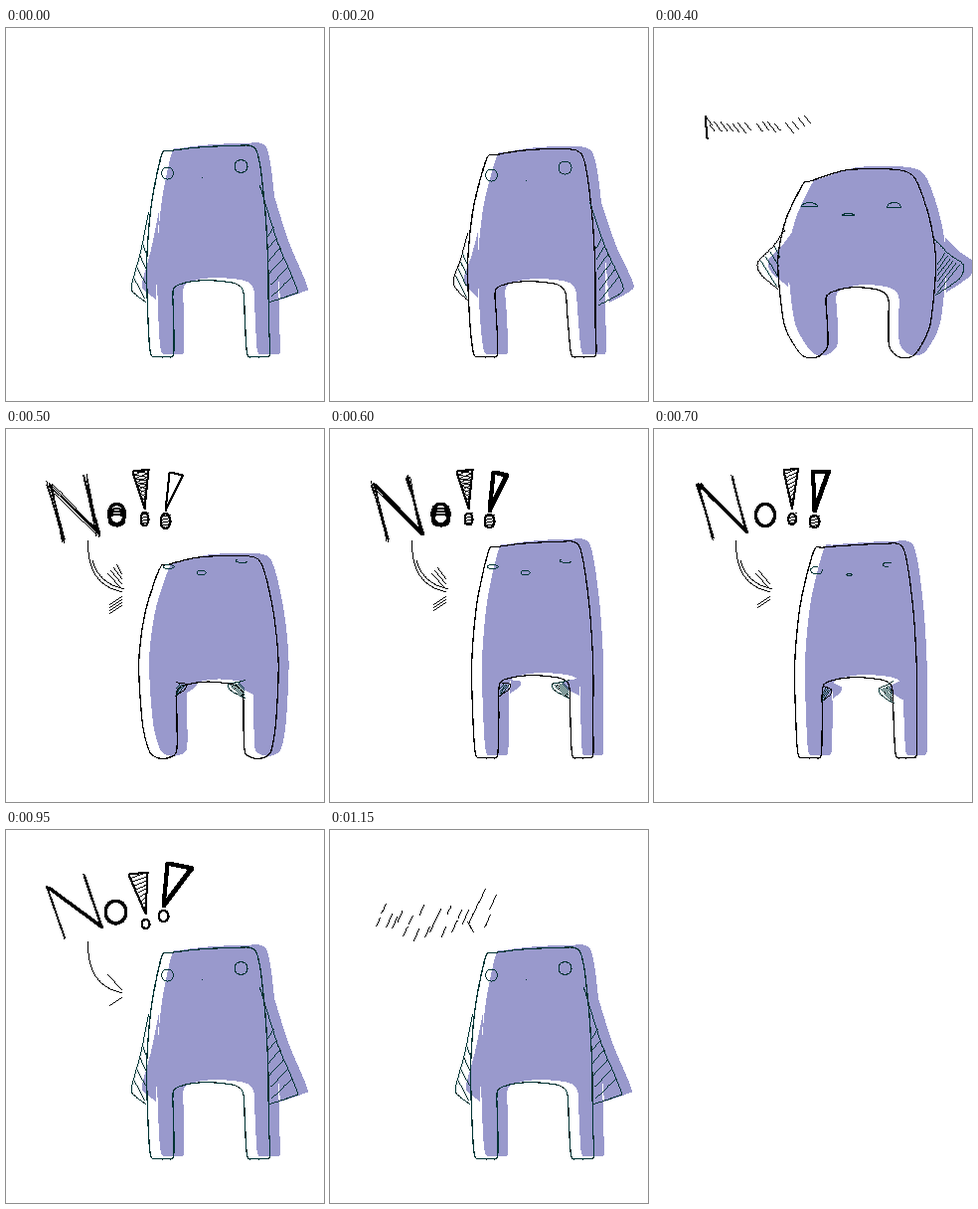
Write an HTML page with a canvas that moves like this. It is 320 by 375 pixels and loops after 1.2 s.

```html
<!DOCTYPE html>
<html lang="en">
<head>
<meta charset="utf-8">
<title>No!!</title>
<style>
html, body { margin: 0; width: 100%; height: 100%; overflow: hidden; background: #fff; }
canvas { display: block; width: 100vw; height: 100vh; image-rendering: pixelated; }
</style>
</head>
<body>
<canvas id="stage" width="320" height="375"></canvas>
<script>
const ctx = document.getElementById('stage').getContext('2d');
const BLACK = '#000', TEAL = '#003333', LILAC = '#9999cc';
const PI = Math.PI, LOOP = 1200, GROUND = 330, WAIST = 235;
const SHIFT = [11, -2]; // the colour is printed beside the ink

// head: left x, y, right x, y, top; feet: four edges, toe roundness; arch: left, right, y
// arms: shoulder, tip, wrist; eyes: x, y, rx, ry, from, to
const idle = {
  head: [156, 127, 251, 122, 118], waist: [141, 263], feet: [145, 168, 242, 265, 3], arch: [168, 238, 254],
  armL: [143, 185, 126, 258, 140, 275], armR: [255, 158, 292, 261, 265, 275],
  eyeL: [162, 145.5, 6, 6, 0, 2 * PI], eyeR: [236, 138.5, 6.5, 6.5, 0, 2 * PI], mouth: [197, 150, .4, .4, 0, 2 * PI]
};
const sink = {
  head: [157, 131, 253, 127, 121], waist: [138, 266], feet: [144, 168, 242, 267, 3], arch: [166, 236, 255],
  armL: [138, 206, 124, 252, 138, 273], armR: [261, 175, 294, 258, 270, 278],
  eyeL: [162, 147.5, 6, 6, 0, 2 * PI], eyeR: [236, 140, 6.5, 6.5, 0, 2 * PI], mouth: [197, 153, .4, .4, 0, 2 * PI]
};
const squash = {
  head: [149, 157, 260, 148, 141], waist: [124, 283], feet: [141, 174, 236, 268, 11], arch: [173, 235, 261],
  armL: [131, 203, 104, 235, 124, 262], armR: [282, 212, 311, 238, 283, 268],
  eyeL: [156, 179, 8, 4, PI, 2 * PI], eyeR: [241, 180, 7, 5, PI, 2 * PI], mouth: [195, 188, 6, 2, PI, 2 * PI]
};
const stretch = {
  head: [159, 122, 250, 117, 113], waist: [142, 264], feet: [146, 168, 243, 264, 3], arch: [170, 240, 248],
  armL: [171, 254, 181, 256, 170, 268], armR: [240, 252, 223, 256, 240, 270],
  eyeL: [163, 138, 5.5, 2, 0, 2 * PI], eyeR: [237, 132, 6, 2, .6, PI + .6], mouth: [196, 144, 4.5, 2.3, 0, 2 * PI]
};
const settle = {
  head: [161, 123, 250, 121, 117], waist: [140, 263], feet: [143, 167, 242, 263, 3], arch: [169, 238, 252],
  armL: [168, 260, 175, 267, 167, 279], armR: [240, 254, 229, 265, 241, 280],
  eyeL: [163, 145, 6, 6, -.4, PI + .4], eyeR: [236, 140, 7, 3, PI, 2 * PI], mouth: [196, 148, .6, .4, 0, 2 * PI]
};
const poses = [idle, sink, squash, stretch, settle, idle];
const moments = [0, 200, 400, 600, 800, 950];

// n: tops of both stems, stem vector; o: centre; bangs: two top corners and tip
const words = [
  { n: [43, 54, 78, 48, 15, 57], o: [111, 85], bang1: [127, 42, 143, 40, 139, 79], bang2: [164, 43, 177, 46, 160, 81] },
  { n: [44, 54, 78, 47, 14, 54], o: [112, 87], bang1: [133, 40, 146, 38, 138, 79], bang2: [155, 41, 173, 39, 162, 82] },
  { n: [41, 56, 78, 45, 18, 52], o: [110, 82], bang1: [123, 44, 142, 42, 140, 83], bang2: [162, 33, 186, 38, 158, 75] }
];

const lerp = (a, b, t) => a + (b - a) * t;
const mix = (a, b, t) => a.map((v, i) => lerp(v, b[i], t));

function blend(a, b, t, detail = t) {
  const out = {};
  for (const key in a) out[key] = mix(a[key], b[key], /arm|eye|mouth/.test(key) ? detail : t);
  return out;
}

function random(seed) {
  return () => (seed = (seed * 16807) % 2147483647) / 2147483647;
}

function line([x1, y1], [x2, y2], w = 1) {
  const n = Math.max(1, Math.ceil(Math.max(Math.abs(x2 - x1), Math.abs(y2 - y1))));
  for (let i = 0; i <= n; i++) {
    const x = lerp(x1, x2, i / n), y = lerp(y1, y2, i / n);
    ctx.fillRect(Math.round(x - (w - 1) / 2), Math.round(y - (w - 1) / 2), w, w);
  }
}

function trace(pts, w) {
  for (let i = 1; i < pts.length; i++) line(pts[i - 1], pts[i], w);
}

function smooth(pts, closed) {
  const n = pts.length, out = [], pull = .4;
  const at = i => pts[closed ? (i + n) % n : Math.min(n - 1, Math.max(0, i))];
  for (let i = 0; i < (closed ? n : n - 1); i++) {
    const [p, a, b, q] = [at(i - 1), at(i), at(i + 1), at(i + 2)];
    for (let t = 0; t < 1; t += 1 / 8) {
      const u = t * t * (3 - 2 * t), d = t * (1 - t) * (1 - t), e = t * t * (t - 1);
      out.push([0, 1].map(c => lerp(a[c], b[c], u) + pull * (d * (b[c] - p[c]) + e * (q[c] - a[c]))));
    }
  }
  out.push(closed ? out[0] : at(n - 1));
  return out;
}

// Hard-edged scanline fill
function area(pts, [dx, dy]) {
  for (let y = 0; y < 375; y++) {
    const xs = [], m = y + .5;
    pts.forEach(([ax, ay], i) => {
      const [bx, by] = pts[(i + 1) % pts.length];
      if ((ay <= m) !== (by <= m)) xs.push(lerp(ax, bx, (m - ay) / (by - ay)));
    });
    xs.sort((a, b) => a - b);
    for (let i = 0; i + 1 < xs.length; i += 2) {
      const x = Math.round(xs[i]);
      ctx.fillRect(x + dx, y + dy, Math.round(xs[i + 1]) - x, 1);
    }
  }
}

function bodyShape({ head, waist, feet, arch }) {
  const [lx, ly, rx, ry, top] = head, [left, right] = waist;
  const [f1, f2, f3, f4, toe] = feet, [al, ar, ay] = arch;
  const side = (x, y, edge, foot) => [
    [lerp(x, edge, .7), lerp(y, WAIST, .47)], [edge, WAIST], [lerp(edge, foot, .35), 295]
  ];
  const sole = (a, b) => [
    [a, GROUND - toe], [lerp(a, b, .3), GROUND], [lerp(a, b, .7), GROUND], [b, GROUND - toe]
  ];
  return smooth([
    [lx, ly], [lx + 9, ly - 4], [lerp(lx, rx, .38), top + 1.5], [lerp(lx, rx, .75), top], [rx, ry],
    ...side(rx, ry, right, f4), ...sole(f4, f3),
    [lerp(f3, ar, .6), 290], [ar, ay + 10], [ar - 9, ay + 2], [(al + ar) / 2, ay - 1], [al + 14, ay + 1], [al, ay + 8],
    [lerp(f2, al, .6), 290], ...sole(f2, f1), ...side(lx, ly, left, f1).reverse()
  ], true);
}

function armShape([sx, sy, tx, ty, wx, wy]) {
  return smooth([
    [sx, sy], [lerp(sx, tx, .48), lerp(sy, ty, .55)], [tx, ty], [lerp(tx, wx, .15), lerp(ty, wy, .45)], [wx, wy]
  ]);
}

// Strokes lean from the body up to the outer edge, longer towards the hand
function hatchArm([sx, sy, tx, ty, wx, wy], n) {
  for (let i = 0; i < n; i++) {
    const u = lerp(.45, .95, i / (n - 1)), reach = lerp(.55, .9, u);
    const from = [lerp(sx, wx, u) + (tx - wx) * .08, lerp(sy, wy, u)];
    line(from, mix(from, [lerp(sx, tx, u), lerp(sy, ty, u - .08)], reach));
  }
}

function arc(x, y, rx, ry, from = 0, to = 2 * PI) {
  return Array.from({ length: 25 }, (_, i) => {
    const a = lerp(from, to, i / 24);
    return [x + rx * Math.cos(a), y + ry * Math.sin(a)];
  });
}

function creature(stage) {
  const i = Math.min(4, Math.floor(stage)), t = stage - i;
  // Arms swap sides of the legs at once
  const jump = i === 2 || i === 4;
  const pose = blend(poses[i], poses[i + 1], t, jump ? Math.round(t) : t);
  const body = bodyShape(pose), arms = [armShape(pose.armL), armShape(pose.armR)];

  ctx.fillStyle = LILAC;
  for (const shape of [body, ...arms]) area(shape, SHIFT);

  ctx.fillStyle = poses[Math.round(stage)] === idle ? TEAL : BLACK;
  trace(body);
  trace(body.map(([x, y]) => [x + .3, y + .2]));
  trace(arms[0]);
  ctx.fillStyle = TEAL;
  trace(arms[1]);
  hatchArm(pose.armL, 4);
  hatchArm(pose.armR, 6);
  for (const part of [pose.eyeL, pose.eyeR, pose.mouth]) {
    const pts = arc(...part);
    trace(pts);
    if (part[4] > 3) line(pts[0], pts[24]); // flat lower lid
  }
}

function lettering(pos, rough) {
  const i = pos < 1 ? 0 : 1, { n, o, bang1, bang2 } = blend(words[i], words[i + 1], pos - i);
  const rnd = random(77 + Math.round(pos * 100)), bold = rough < 3.6 ? 4 : 2;
  const scratch = (a, b, w) => {
    const shake = p => p.map(v => v + (rnd() - .5) * (rough + 1.5));
    line(a, b, w);
    for (let k = 0; k < 2 + rough; k++) line(shake(a), shake(b));
  };
  const [lx, ly, rx, ry, vx, vy] = n, foot = [rx + vx, ry + vy];
  scratch([lx, ly], [lx + vx, ly + vy], 1);
  scratch([lx + 2, ly + 2], foot, bold - 1);
  scratch([rx, ry], foot, 2);

  const [ox, oy] = o, or = 11 - rough * .8;
  trace(arc(ox, oy, or, 12 - rough * .5), 3);
  if (rough > 2) for (let k = 2; k < 8; k += 2) trace(arc(ox, oy + k, or, 9 - k * .5), 2);

  [bang1, bang2].forEach((b, k) => {
    const p = b.slice(0, 2), q = b.slice(2, 4), tip = b.slice(4);
    const w = k ? bold : 2;
    line(p, q, w); line(q, tip, w); line(tip, p, w);
    if (!k) for (let u = .1; u < .9; u += .1) {
      line(mix(p, tip, u), mix(q, tip, u - .1));
      if (rough > 2) line(mix(p, tip, u - .1), mix(q, tip, u));
    }
    const [x, y] = [tip[0], tip[1] + 11], r = 4 + k;
    trace(arc(x, y, r, r + rough * .6), 2);
    if (rough > 1.4) for (let d = -4; d < 6; d += 3) line([x - r, y + d], [x + r, y + d - 2]);
  });

  const end = [116, 163], start = [82, 112];
  const shaft = Array.from({ length: 21 }, (_, k) => {
    const t = k / 20;
    return mix(mix(start, [81, 156], t), mix([81, 156], end, t), t);
  });
  trace(shaft);
  if (rough > 1.8) trace(shaft.slice(6).map(([x, y]) => [x + 2, y - 3]));
  for (let k = 0; k < rough; k++) {
    line([end[0] - 14 + 3 * k, end[1] - 18 - 3 * k], [end[0], end[1] - 3 - 5 * k]);
    line([end[0] - 12, end[1] + 13 + 3 * k], [end[0], end[1] + 5 + 3 * k]);
  }
}

// Loose strokes where the word appears and fades
function marksIn(size) {
  const rnd = random(5);
  line([51, 88], [53, 110], 2);
  line([51, 88], [58, 97]);
  for (let x = 58; x < 160; x += 6) {
    if (Math.abs(x - 98) < 4 || Math.abs(x - 131) < 5) continue;
    const h = (3 + rnd() * 2) * size, y = 98 + rnd() * 3 - Math.max(0, x - 138) * .5;
    line([x - h * .8, y - h], [x + h * .8, y + h]);
  }
}

function marksOut(size) {
  const rnd = random(11);
  for (let x = 48; x < 164; x += 5.5) {
    const h = (4 + rnd() * 3) * size, y = 94 - Math.max(0, x - 105) * .25 + (rnd() - .5) * 34;
    line([x - h * .45, y + h], [x + h * .45, y - h]);
  }
  for (let k = 0; k < 4; k++) line([138 + k, 92 + k * 2], [144 - k, 102 - k * 2]);
}

// 50 ms ticks, some of them held for two
function tickAt(time) {
  const tick = Math.floor(time / 50) * 50;
  return [50, 150, 250, 900, 1000].includes(tick) ? tick - 50 : tick;
}

function stageAt(time) {
  if (time >= 950) return 5;
  const i = moments.findIndex(m => m > time) - 1;
  const t = (time - moments[i]) / (moments[i + 1] - moments[i]);
  return i + t * t * (3 - 2 * t);
}

function draw(time) {
  const stage = stageAt(time);
  ctx.fillStyle = '#fff';
  ctx.fillRect(0, 0, 320, 375);
  creature(stage);
  ctx.fillStyle = BLACK;
  if (time >= 1100) marksOut(time < 1150 ? 1.7 : 1);
  else if (time >= 500) lettering(Math.max(0, stage - 3) + Math.max(0, time - 950) / 300, Math.max(1, 1 + (800 - time) / 100));
  else if (time >= 400) marksIn(time < 450 ? 1 : 1.7);
}

const begin = performance.now();
function frame() {
  draw(tickAt((performance.now() - begin) % LOOP));
  requestAnimationFrame(frame);
}
frame();
</script>
</body>
</html>
```
